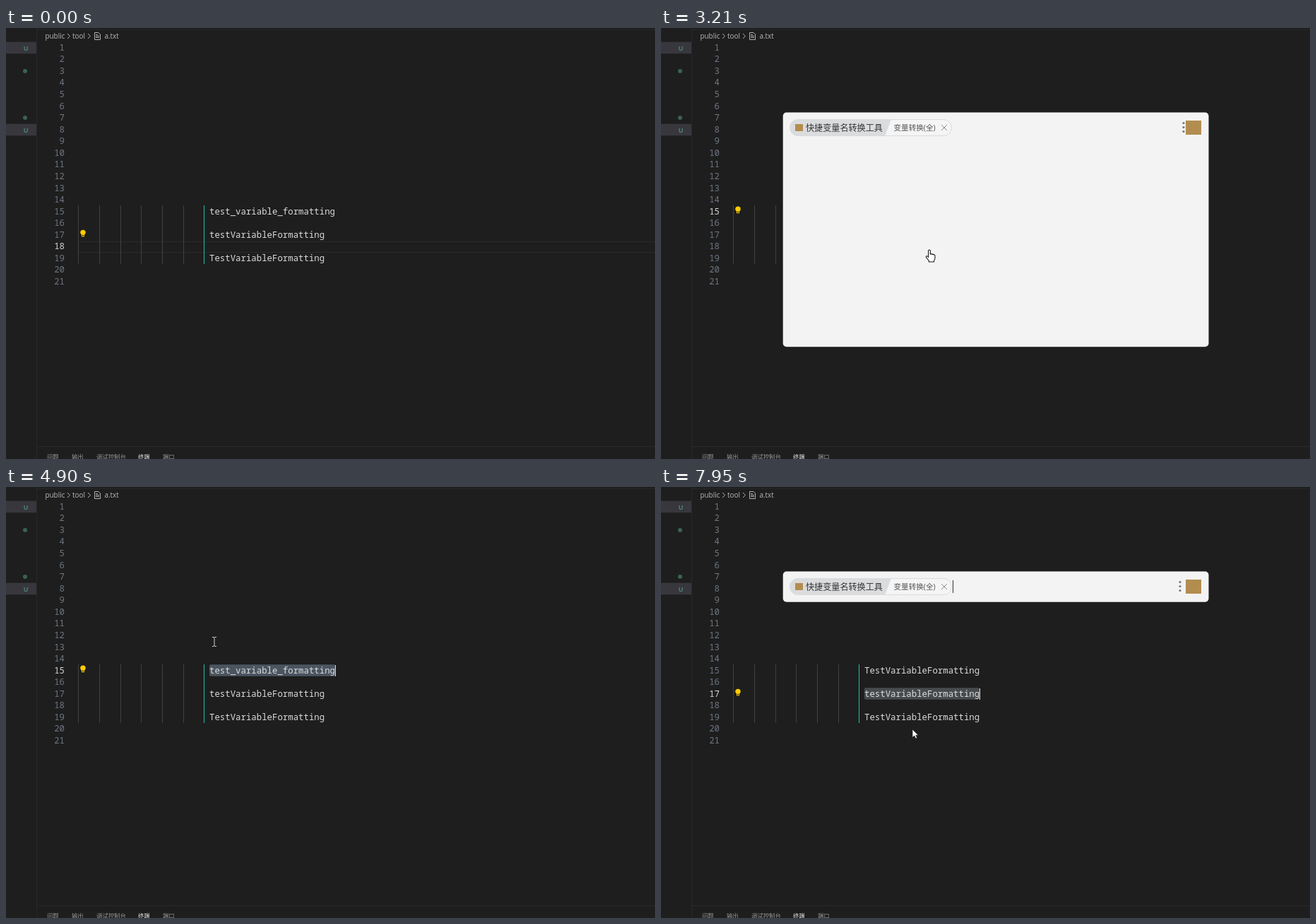
Animation of 919x610 px, one loop 8000 ms. Source, as an HTML page with a canvas:

```html
<!DOCTYPE html>
<html lang="zh-CN">
<head>
<meta charset="utf-8">
<title>Variable converter</title>
<style>
html, body { margin: 0; height: 100%; overflow: hidden; background: #1e1e1e; }
canvas { display: block; }
</style>
</head>
<body>
<canvas id="stage" width="919" height="610"></canvas>
<script>
const ctx = document.getElementById('stage').getContext('2d');
const LOOP = 8000;
const UI = "'Open Sans', 'Noto Sans CJK SC', 'Noto Sans CJK', sans-serif";
const MONO = "12.37px 'Noto Sans Mono', monospace";
const CHAR = 7.42, LINE = 16.56, CODE_X = 288;
const TAN = '#b38d50';

const rows = [
  ['testVariableFormatting', 'camelCase 小驼峰'],
  ['TestVariableFormatting', 'pascalCase 大驼峰'],
  ['TEST_VARIABLE_FORMATTING', 'constantCase 常量'],
  ['test_variable_formatting', 'snakeCase 下划线(小)'],
  ['Test_Variable_Formatting', 'pascalSnakeCase 下划线(大)'],
  ['Test Variable Formatting', 'capitalCase 分词(大)'],
  ['Test variable formatting', 'sentenceCase 分词(小)'],
  ['Test-Variable-Formatting', 'trainCase 连字符']
];

// Pointer moves: start, end, x and y on arrival
const moves = [
  [130, 930, 437, 296],
  [950, 1260, 391, 260],
  [2480, 2790, 380, 314],
  [3610, 4190, 295, 219],
  [5530, 5840, 362, 292],
  [7260, 7630, 356, 343]
];

const within = (t, a, b) => t >= a && t < b;
const progress = (t, a, b) => Math.min(1, Math.max(0, (t - a) / (b - a)));
const lineY = n => 27.6 + LINE * (n - 1);

function text(str, x, y, font, color, align = 'left') {
  ctx.font = font;
  ctx.fillStyle = color;
  ctx.textAlign = align;
  ctx.fillText(str, x, y);
}

function rect(x, y, w, h, color) {
  ctx.fillStyle = color;
  ctx.fillRect(x, y, w, h);
}

function dot(x, y, r, color) {
  ctx.fillStyle = color;
  ctx.beginPath();
  ctx.arc(x, y, r, 0, Math.PI * 2);
  ctx.fill();
}

function path(d, stroke, fill, x = 0, y = 0, width = 1) {
  const p = new Path2D(d);
  ctx.save();
  ctx.translate(x, y);
  ctx.lineWidth = width;
  if (fill) { ctx.fillStyle = fill; ctx.fill(p); }
  if (stroke) { ctx.strokeStyle = stroke; ctx.stroke(p); }
  ctx.restore();
}

function card(x, y, w, h, color, shadow = 0) {
  ctx.save();
  ctx.shadowColor = `rgba(0,0,0,${shadow})`;
  ctx.shadowBlur = 30;
  ctx.shadowOffsetY = 8;
  ctx.fillStyle = color;
  ctx.beginPath();
  ctx.roundRect(x, y, w, h, 5);
  ctx.fill();
  ctx.restore();
}

function pointer(t) {
  let x = 612, y = 567;
  for (const [start, end, toX, toY] of moves) {
    const p = 1 - (1 - progress(t, start, end)) ** 2;
    x += (toX - x) * p;
    y += (toY - y) * p;
  }
  return { x, y };
}

function drawFrame() {
  rect(0, 0, 919, 610, '#1e1e1e');
  rect(43, 0, 1, 610, '#282828');
  rect(43, 2, 876, 1, '#282828');
  rect(43, 592, 876, 1, '#2a2a2a');
  for (const y of [19.7, 135.7]) {
    rect(0, y, 43, 16.6, '#37373d');
    text('U', 28, y + 11.8, '600 9px ' + UI, '#57977a', 'center');
  }
  dot(27, 61, 3, '#3c624e');
  dot(27, 127, 3, '#3c624e');

  const crumb = '9.9px ' + UI;
  text('public', 55.5, 15, crumb, '#b8b8b8');
  text('tool', 94, 15, crumb, '#b8b8b8');
  text('a.txt', 139.5, 15, crumb, '#b8b8b8');
  path('M87 8l3.5 3.5L87 15M116 8l3.5 3.5L116 15', '#b0b0b0');
  path('M125.5 6.5h5.5l2.5 2.5v7.5h-8zM127 9.5h3M127 11.5h5M127 13.5h5', '#b0b0b0');

  [['问题', 58], ['输出', 93], ['调试控制台', 128], ['终端', 187], ['端口', 222]].forEach(([label, x]) =>
    text(label, x, 609.5, '8.4px ' + UI, label === '终端' ? '#e7e7e7' : '#989898'));
}

function drawEditor(t, focused) {
  const current = t < 1440 ? 18 : t < 6080 ? 15 : 17;
  const selected = within(t, 1620, 5080) ? 24 : t >= 6260 ? 22 : 0;
  const y = lineY(current);

  if (!selected) {
    rect(102, Math.round(y - 7.6), 817, 1, '#2b2b2b');
    rect(102, Math.round(y + 7.4), 817, 1, '#2b2b2b');
  } else {
    ctx.fillStyle = focused ? '#4a5560' : '#484b4e';
    ctx.beginPath();
    ctx.roundRect(CODE_X, y - 8.3, selected * CHAR, LINE, 2);
    ctx.fill();
  }
  for (let i = 0; i < 6; i++) rect(Math.round(102 + i * 29.75), 251, 1, 83, '#404040');
  rect(280, 251, 1, 83, '#22bfb0');

  for (let n = 1; n <= 21; n++)
    text(n, 83, lineY(n) + 4.2, MONO, n === current ? '#d6d6d6' : '#6e7681', 'right');
  const first = t < 5080 ? 'test_variable_formatting' : 'TestVariableFormatting';
  [first, 'testVariableFormatting', 'TestVariableFormatting'].forEach((line, i) =>
    text(line, CODE_X, lineY(15 + 2 * i) + 4.2, MONO, '#dcdcdc'));

  const bulb = t < 1440 || t >= 6600 ? 17 : within(t, 1860, 5340) ? 15 : 0;
  if (bulb) {
    const by = lineY(bulb) - 3.2;
    dot(109, by, 3.7, '#ffcc00');
    rect(107, by + 2, 4, 4, '#ffcc00');
    rect(108, by + 3.5, 2, 1.5, '#1e1e1e');
  }

  if (t >= 1440 && !within(t, 5710, 6080)) {
    const column = within(t, 1440, 1620) ? 14 : within(t, 6080, 6260) ? 10 : selected || 22;
    rect(Math.round(CODE_X + column * CHAR - 0.4), Math.round(y - 7.6), 1, 16, '#dddddd');
  }
}

function drawPopup(x, y, age, mouse) {
  const h = 42 + 69 * progress(age, 40, 160);
  card(x, y, 192, h, '#f4f4f4', 0.4);
  const fur = ctx.createRadialGradient(x + 22, y + 24, 1, x + 21, y + 21, 13);
  fur.addColorStop(0, '#c4c2c0');
  fur.addColorStop(1, '#77746f');
  dot(x + 21, y + 21, 12, fur);

  ctx.save();
  ctx.beginPath();
  ctx.rect(x, y + 42, 192, h - 42);
  ctx.clip();
  if (mouse.y > y + 42) rect(x, y + 42, 192, 34, '#dcdfe4');
  ['变量转换(全)', '变量转换'].forEach((label, i) => {
    const top = y + 42 + i * 34;
    rect(x + 14, top + 10, 14, 14, TAN);
    text(label, x + 38, top + 21, '11px ' + UI, '#333');
  });
  ctx.restore();
}

function drawPanel(t, mouse) {
  const full = within(t, 3210, 4900);
  card(172.7, 119.6, 602.8, full ? 331.7 : 43.2, '#f3f3f3');

  ctx.save();
  ctx.beginPath();
  ctx.roundRect(182.5, 129.5, 229, 23, 11.5);
  ctx.clip();
  rect(182, 129, 230, 24, '#f5f5f5');
  path('M182 129H326L317 153H182z', null, '#dadcde');
  ctx.restore();
  ctx.strokeStyle = '#d9dbdd';
  ctx.lineWidth = 1;
  ctx.stroke();
  rect(190, 136, 11, 10, TAN);
  text('快捷变量名转换工具', 205, 145.5, '12.1px ' + UI, '#333');
  text('变量转换(全)', 329.5, 145, '10.6px ' + UI, '#555');
  path('M397 137l8 8M405 137l-8 8', '#888');
  rect(743, 131, 22, 20, TAN);
  const dotsX = within(t, 3210, 3260) ? 740 : 735;
  for (const y of [134.5, 140.5, 146.5]) dot(dotsX, y, 1.6, '#777');
  if (!full) rect(413, 132, 1, 18, '#333');

  if (!full) return;
  ctx.save();
  ctx.globalAlpha = progress(t, 3230, 3400);
  ctx.beginPath();
  ctx.roundRect(172.7, 162, 602.8, 289.3, [0, 0, 5, 5]);
  ctx.clip();
  rect(172, 162, 604, 290, '#fefefe');
  const active = t < 3640 ? 0 : Math.floor((mouse.y - 162) / 36.1);
  rows.forEach(([title, note], i) => {
    const y = 162 + i * 36.1;
    if (i === active) rect(173, y, 602, 36.1, '#dcdfe4');
    text(title, 183.5, y + 15, '10.85px ' + UI, '#2c2c2c');
    text(note, 183.5, y + 29, '9px ' + UI, '#868686');
    text('Alt+' + (i + 1), 767.5, y + 22.5, '300 12px ' + UI, '#222', 'right');
  });
  ctx.restore();
}

function drawPointer({ x, y }, shape) {
  if (shape === 'beam')
    path('M-3 -6.5h2.2l.8 .8l.8 -.8H3M0 -6V6M-3 6.5h2.2l.8 -.8l.8 .8H3', '#d0d0d0', null, x, y);
  else if (shape === 'arrow')
    path('M0 0V11.5L2.8 9L4.7 13L6.6 12.2L4.8 8.3H8.3z', '#222', '#fff', x, y, 0.7);
  else
    path('M-1.4 1Q0 -1 1.4 1V6Q3 5 4 6.5Q5.4 5.7 6.2 7Q8 6.5 8 8.5V12Q7.6 14 6.5 15.5V17H-.6V15.5L-4.6 10.5Q-5 8.5 -3.2 8.7L-1.4 10.3z',
      '#1a1a1a', '#fff', x, y, 1.1);
}

function render(now) {
  const t = now % LOOP;
  const mouse = pointer(t);
  const popupStart = within(t, 2180, 3110) ? 2180 : within(t, 6830, 7900) ? 6830 : 0;
  const panel = within(t, 3160, 4900) || t >= 7950;

  drawFrame();
  drawEditor(t, !popupStart && !panel);
  if (popupStart === 2180) drawPopup(294, 239, t - popupStart, mouse);
  if (popupStart === 6830) drawPopup(266, 271, t - popupStart, mouse);
  if (panel) drawPanel(t, mouse);
  if (t >= 160) {
    const hand = popupStart || within(t, 3210, 4900);
    drawPointer(mouse, hand ? 'hand' : panel ? 'arrow' : 'beam');
  }
  requestAnimationFrame(() => render(performance.now()));
}

render(performance.now());
</script>
</body>
</html>
```
